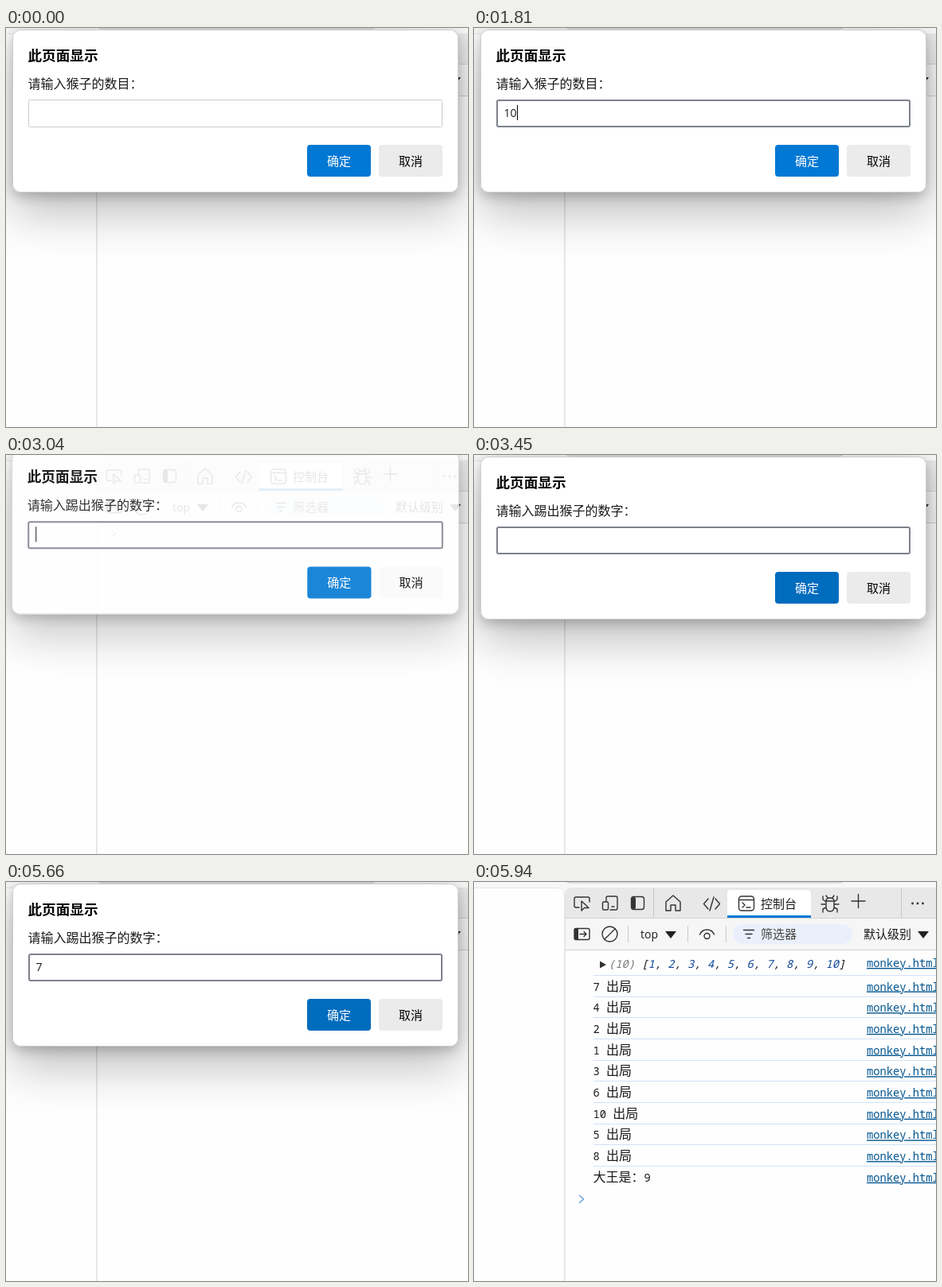
An HTML page for the animation above (7810 ms loop, 580 px wide and 502 px high).

```html
<!DOCTYPE html>
<html lang="zh-CN">
<head>
<meta charset="utf-8">
<title>猴子选大王</title>
<style>
  html, body { margin: 0; width: 100%; height: 100%; overflow: hidden; background: #fff; }
  svg { display: block; }
  #stage { position: relative; width: 580px; height: 502px; overflow: hidden; }
  text { font-family: "Open Sans", "Noto Sans CJK SC", "Noto Sans CJK", sans-serif; fill: #1b1b1b; white-space: pre; }
  .cjk { font-family: "Noto Sans CJK SC", "Noto Sans CJK", sans-serif; }
  .mono { font-family: "Noto Sans Mono", "Noto Sans CJK SC", "Noto Sans CJK", monospace; font-size: 13.75px; }
  .link { fill: #00558f; text-decoration: underline; }
  .array { font-style: italic; }
  .num { fill: #0b4596; }
  .icon { fill: none; stroke: #333; stroke-width: 1.4; stroke-linecap: round; stroke-linejoin: round; }
  .sep { stroke: #c9c9c9; }
  .rule { stroke: #d3e1f5; }
  #dialog {
    position: absolute; left: 8px; top: 2px; width: 560px; height: 205px;
    border-radius: 10px; background: #fff; transform-origin: 50% 0;
    box-shadow: inset 0 0 0 1px #cdcdcd, 0 25.6px 57.6px rgba(0,0,0,.25), 0 4.8px 14.4px rgba(0,0,0,.22);
  }
</style>
</head>
<body>
<div id="stage">
  <svg width="580" height="502">
    <rect width="580" height="502" fill="#f7f7f7"/>
    <rect x="112.5" y="-28" width="354" height="29" rx="8" fill="#fff" stroke="#bdbdbd"/>
    <path d="M-2 7.5H104Q113.5 7.5 113.5 17V504H-2Z" fill="#fefefe" stroke="#e6e6e6"/>
    <path d="M115 502V16Q115 7 124 7H580V502Z" fill="#fefefe"/>
    <path d="M115 46V16Q115 7 124 7H580V46Z" fill="#e8e8e8"/>
    <rect x="115" y="46" width="465" height="39" fill="#f6f6f6"/>
    <path d="M115 45.5H580M115 85.5H580" stroke="#d2d2d2"/>
    <path d="M114.5 502V16Q114.5 7.5 124 7.5H580" fill="none" stroke="#e6e6e6"/>
    <path class="sep" d="M225.5 8V45M536.5 8V45M193.5 55V76M268.5 55V76M316.5 55V76"/>

    <path d="M318 45V14Q318 10 322 10H419Q423 10 423 14V45Z" fill="#fff"/>
    <rect x="318" y="42" width="105" height="3" fill="#0078d4"/>
    <text class="cjk" x="360" y="33" font-size="15">控制台</text>

    <g class="icon">
      <path d="M132 32H128Q126 32 126 30V21Q126 19 128 19H143Q145 19 145 21V25M135 24V36L138.500 32.500H144Z"/>
      <path d="M166 24V20Q166 18 168 18H178Q180 18 180 20V33Q180 35 178 35H171M173 31H176"/>
      <rect x="161.500" y="25" width="7" height="10" rx="1.500"/>
      <rect x="197.500" y="18.500" width="16" height="16" rx="3"/>
      <path d="M241 25L250 17L259 25V36H253V29H247V36H241Z"/>
      <path d="M294 21L288.500 27.500L294 34M303 21L308.500 27.500L303 34M301 19L296 36"/>
      <rect x="332.500" y="18" width="19" height="18" rx="3.500"/>
      <path d="M333 22.500H351M337 26L340 29L337 32M342 32H347"/>
      <path d="M442 24Q442 20 447 20T452 24V31Q452 37 447 37T442 31ZM442 24H452M444 20L442 17M450 20L452 17M442 28H436M452 28H458M442 25L438 22V18M452 25L456 22V18M442 32L438 34V38M452 32L456 34V38"/>
      <path d="M482.500 15.500V32.500M474 24H491"/>
      <rect x="126" y="58.500" width="19" height="14" rx="2"/>
      <path d="M133 65.500H141M138 62.500L141 65.500L138 68.500"/>
      <circle cx="170.500" cy="65.500" r="9.500"/>
      <path d="M164 72L177 59"/>
      <path d="M283.500 66Q286 60 292.500 60T301.500 66"/>
      <circle cx="292.500" cy="68" r="3.500"/>
    </g>
    <rect x="198" y="19" width="5" height="15" rx="2" fill="#333"/>
    <rect x="126" y="59" width="5" height="13" fill="#333"/>
    <g fill="#333">
      <circle cx="550.500" cy="27" r="1.400"/><circle cx="557" cy="27" r="1.400"/><circle cx="563.500" cy="27" r="1.400"/>
    </g>
    <rect x="325" y="53" width="150" height="25" rx="12.500" fill="#eaf0fb"/>
    <path class="icon" d="M338.500 60.500H351.500M341 65.500H349M343.500 70.500H346.500"/>
    <path d="M240 62H254L247 71ZM557 62H571L564 71Z" fill="#222"/>
    <text x="209" y="71" font-size="14">top</text>
    <text class="cjk" x="360" y="71" font-size="15" style="fill:#444">筛选器</text>
    <text class="cjk" x="489" y="71" font-size="15">默认级别</text>

    <g id="first">
      <path d="M158 99.500V108.500L166 104Z" fill="#333"/>
      <text class="mono array" id="array" x="169" y="108"></text>
      <text class="mono link" x="493" y="107">monkey.html:18</text>
      <path class="rule" d="M150 117.500H580"/>
    </g>
    <g id="log"></g>
    <path id="prompt" d="M132 -5L137.500 0L132 5" fill="none" stroke="#6f9fe0" stroke-width="1.500"/>
  </svg>

  <div id="dialog">
    <svg width="560" height="205" viewBox="8 2 560 205">
      <text class="cjk" x="27.500" y="40.500" font-size="17.600" font-weight="700" style="fill:#000">此页面显示</text>
      <text class="cjk" id="label" x="27.500" y="76" font-size="16"></text>
      <rect id="field" fill="#fff"/>
      <text id="value" x="37.500" y="112" font-size="14.100"></text>
      <rect id="caret" y="97" width="1" height="19" fill="#000"/>
      <rect id="ok" x="378" y="147" width="80" height="40" rx="4"/>
      <text class="cjk" x="403" y="172.500" font-size="15" style="fill:#fff">确定</text>
      <rect id="cancel" x="468" y="147" width="80" height="40" rx="4"/>
      <text class="cjk" x="493" y="172.500" font-size="15" style="fill:#000">取消</text>
    </svg>
  </div>
</div>

<script>
const LOOP = 7810;
const $ = id => document.getElementById(id);

// Josephus elimination: ten monkeys, every seventh leaves.
const ring = Array.from({ length: 10 }, (_, i) => i + 1);
$('array').innerHTML = '<tspan fill="#777">(10)</tspan> [' +
  ring.map(n => `<tspan class="num">${n}</tspan>`).join(', ') + ']';
const lines = [];
for (let i = 0; ring.length > 1;) {
  i = (i + 6) % ring.length;
  const n = ring.splice(i, 1)[0];
  lines.push(`${n} <tspan font-size="16">出局</tspan>`);
}
lines.push(`<tspan font-size="16">大王是\uff1a</tspan>${ring[0]}`);
$('log').innerHTML = lines.map((line, i) => {
  const y = 136.5 + 26.7 * i;
  const rule = Math.round(y + 7) + 0.5;
  return `<text class="mono" x="149.5" y="${y}">${line}</text>` +
    `<text class="mono link" x="493" y="${y}">monkey.html:${i < 9 ? 32 : 40}</text>` +
    (i < 9 ? `<path class="rule" d="M150 ${rule}H580"/>` : '');
}).join('');

// Each track holds [start ms, state].
const REST = '#0078d4', HOVER = '#006cbe', PRESS = '#0060aa';
const button = [[0, REST], [1970, HOVER], [2840, PRESS], [2960, REST], [3120, HOVER],
  [3610, REST], [5660, HOVER], [5820, PRESS], [5860, REST]];
const label = [[0, '请输入猴子的数目\uff1a'], [3000, '请输入踢出猴子的数字\uff1a']];
const value = [[0, ''], [1070, '1'], [1520, '10'], [3000, ''], [4810, '7']];
const focus = [[0, false], [700, true], [2960, false], [3000, true], [5860, false]];
const caret = [[0, false], [700, true], [2090, false], [2590, true], [2960, false], [3000, true],
  [3450, false], [4020, true], [5300, false], [5820, true], [5860, false]];
// Opacity, lift and scale of the dialog
const pose = [[0, [1, 0, 1]], [2960, [.8, 9, 1.004]], [3000, [.4, 16, 1.007]],
  [3040, [.89, 7, 1.003]], [3080, [.97, 2.5, 1.001]], [3120, [1, 0, 1]],
  [5860, [.816, 9, 1.004]], [5900, [.3, 18, 1.008]], [5940, [0, 18, 1.008]]];
const promptY = [[0, 99], [5860, 131], [5940, 399]];

const at = (track, t) => track.findLast(([start]) => start <= t)[1];
const show = (id, on) => { $(id).style.visibility = on ? 'visible' : 'hidden'; };
const attrs = (id, values) => {
  for (const name in values) $(id).setAttribute(name, values[name]);
};

function draw(t) {
  const [alpha, lift, scale] = at(pose, t);
  $('dialog').style.opacity = alpha;
  $('dialog').style.transform = `translateY(${-lift}px) scale(${scale})`;
  $('label').textContent = at(label, t);

  const text = at(value, t);
  $('value').textContent = text;
  attrs('caret', { x: 38 + 8 * text.length });
  show('caret', at(caret, t));

  const w = at(focus, t) ? 2 : 1;
  attrs('field', {
    x: 28 + w / 2, y: 90 + w / 2, width: 520 - w, height: 35 - w,
    rx: 2, stroke: w > 1 ? '#7d828b' : '#cccccc', 'stroke-width': w
  });
  attrs('ok', { fill: at(button, t) });
  attrs('cancel', { fill: alpha < 1 ? '#fafafa' : '#ebebeb' });

  show('first', t >= 5860);
  show('log', t >= 5940);
  attrs('prompt', { transform: `translate(0 ${at(promptY, t)})` });
}

const begin = performance.now();
function tick() {
  draw((performance.now() - begin) % LOOP);
  requestAnimationFrame(tick);
}
tick();
</script>
</body>
</html>
```
